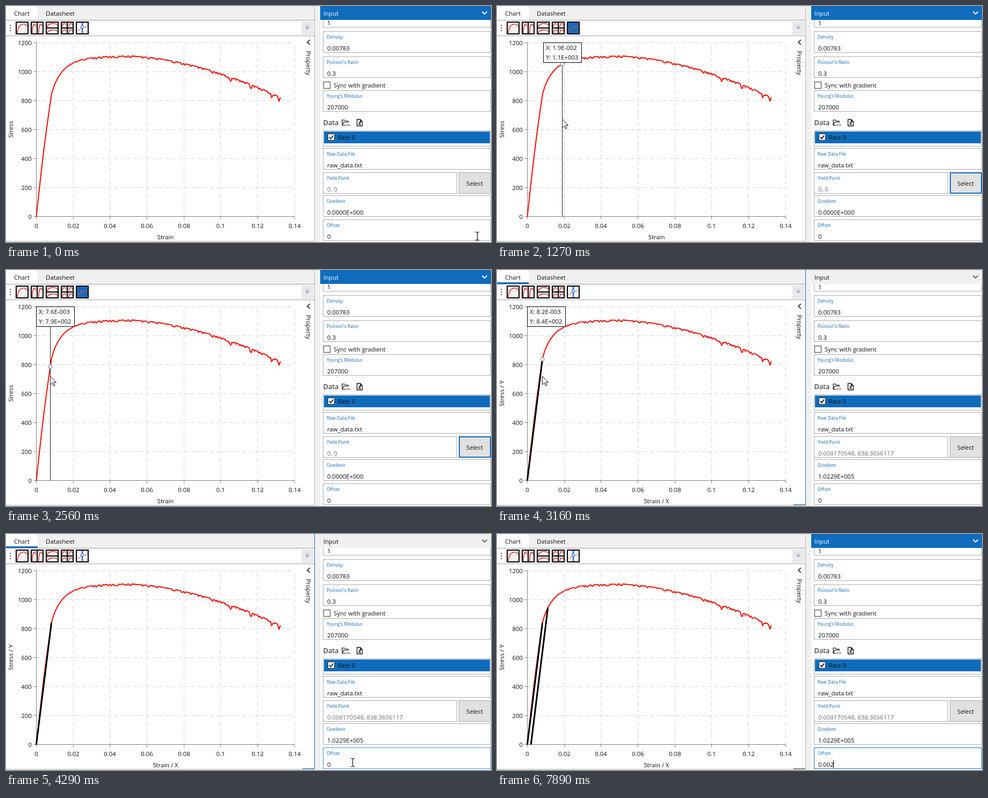
These frames come from a looping animation (903x440 px, 8.37 s). An HTML page with a canvas:

```html
<!DOCTYPE html>
<html lang="en">
<head>
<meta charset="utf-8">
<title>Yield point selection</title>
<style>
html, body { margin: 0; width: 100%; height: 100%; overflow: hidden; background: #fff; }
canvas { display: block; }
</style>
</head>
<body>
<canvas id="stage" width="903" height="440"></canvas>
<script>
const ctx = document.getElementById('stage').getContext('2d');
const LOOP = 8370;
const BLUE = '#0f6cbd', GREY = '#ababab', PANEL = '#f0f0f0', RED = '#f80c08', INK = '#111';
const FONT = '"Open Sans", "Noto Sans", sans-serif';

// Moments of the story, in ms
const ARMED = 790, PICKED = 3160, LEAVE = 3490, EDIT = 4480, MOUSE_HIDDEN = 5120, APPLIED = 6200;
const KEYS = [5210, 5410, 5540, 5740];
const BLINK = 1075;

// Plot geometry
const X0 = 56.5, Y0 = 392.5, TOP = 68.5, RIGHT = 537;
const perStrain = (RIGHT - X0) / 0.14, perStress = (Y0 - TOP) / 1200;
const yieldPoint = { x: X0 + 0.008170548 * perStrain, y: Y0 - 838.3656 * perStress };
const peak = { x: 222, y: 93 };

// Mouse strokes in small jumps, each ending at x, y
const mouseStart = { x: 877, y: 429 };
const strokes = [
  { from: 70, to: 590, steps: 9, x: 868, y: 330 },
  { from: 790, to: 1270, steps: 8, x: 121, y: 211 },
  { from: 1340, to: 1610, steps: 5, x: 84, y: 199 },
  { from: 1690, to: 1890, steps: 4, x: 80, y: 199 },
  { from: 2090, to: 2420, steps: 5, x: 79, y: 198 },
  { from: 2560, to: 2630, steps: 2, x: 84, y: 198 },
  { from: LEAVE, to: 4290, steps: 13, x: 645, y: 426 },
  { from: 7490, to: 7690, steps: 4, x: 790, y: 455 }
];

const fields = [
  { y: 0, label: '', value: () => '1' },
  { y: 47, label: 'Density', value: () => '0.00783' },
  { y: 94, label: "Poisson's Ratio", value: () => '0.3' },
  { y: 157, label: "Young's Modulus", value: () => '207000' },
  { y: 265, label: 'Raw Data File', value: () => 'raw_data.txt' },
  { y: 310, label: 'Yield Point', value: t => t < PICKED ? '0, 0' : '0.008170548, 838.3656117', w: 250, ink: '#707070' },
  { y: 353, label: 'Gradient', value: t => t < PICKED ? '0.0000E+000' : '1.0229E+005' },
  { y: 398, label: 'Offset', value: typedOffset, editable: true }
];

function typedOffset(t) {
  return '0.002'.slice(0, 1 + KEYS.filter(at => at <= t).length);
}

function caretOn(t) {
  const lastInput = Math.max(EDIT, ...KEYS.filter(at => at <= t));
  return (t - lastInput) % BLINK < BLINK / 2;
}

const ease = u => u * u * (3 - 2 * u);

function mouseAt(t) {
  if (t >= MOUSE_HIDDEN && t < strokes[strokes.length - 1].from) return null;
  let { x, y } = mouseStart;
  for (const s of strokes.filter(s => s.from <= t)) {
    const jump = Math.floor((t - s.from) / (s.to - s.from) * (s.steps - 1) + 1.1);
    const e = ease(Math.min(1, jump / s.steps));
    x += (s.x - x) * e;
    y += (s.y - y) * e;
  }
  return { x: Math.round(x), y: Math.round(y) };
}

function inside(m, x, y, w, h) {
  return m && m.x >= x && m.x < x + w && m.y >= y && m.y < y + h;
}

// Slightly bowed elastic line, saturating rise to the peak, then a power-law fall
function curveY(x) {
  if (x < yieldPoint.x) {
    const u = (x - X0) / (yieldPoint.x - X0);
    return Y0 + (yieldPoint.y - Y0) * (u + 0.05 * Math.sin(Math.PI * u));
  }
  if (x < peak.x) {
    return peak.y + (yieldPoint.y - peak.y) * Math.exp(-(((x - yieldPoint.x) / 22) ** 0.9));
  }
  return peak.y + 33 * ((x - peak.x) / 178) ** 1.75;
}

function noise(i) {
  const v = Math.sin(i * 91.7 + 3.1) * 43758.5453;
  return v - Math.floor(v);
}

function makeTrace() {
  const drops = [[168, 4], [384, 5], [418, 10], [456, 6], [495, 7], [508, 7]];
  const points = [];
  for (let x = X0; x <= 511; x += 2) {
    const r = noise(x), ripple = Math.min(1, Math.max(0, (x - 90) / 80));
    const drop = drops.reduce((sum, [at, depth]) => sum + depth * Math.max(0, 1 - Math.abs(x - at) / 3), 0);
    points.push([x, curveY(x) + drop + ripple * (r < 0.26 ? 2.6 : r - 0.5)]);
  }
  return points;
}
const trace = makeTrace();

// Drawing helpers
function fill(x, y, w, h, color) {
  ctx.fillStyle = color;
  ctx.fillRect(x, y, w, h);
}

function frame(x, y, w, h, color, width = 1) {
  ctx.strokeStyle = color;
  ctx.lineWidth = width;
  ctx.strokeRect(x + width / 2, y + width / 2, w - width, h - width);
}

function line(points, color, width = 1) {
  ctx.strokeStyle = color;
  ctx.lineWidth = width;
  ctx.beginPath();
  points.forEach(p => ctx.lineTo(p[0], p[1]));
  ctx.stroke();
}

function text(s, x, y, { size = 11.3, color = INK, align = 'left' } = {}) {
  ctx.font = `${size}px ${FONT}`;
  ctx.fillStyle = color;
  ctx.textAlign = align;
  ctx.fillText(s, x, y);
}

function turnedText(s, x, y, angle, align) {
  ctx.save();
  ctx.translate(x, y);
  ctx.rotate(angle);
  text(s, 0, 0, { align });
  ctx.restore();
}

function shape(d, x, y, { stroke, width = 1, inner }) {
  ctx.save();
  ctx.translate(x, y);
  const p = new Path2D(d);
  if (inner) { ctx.fillStyle = inner; ctx.fill(p); }
  if (stroke) { ctx.strokeStyle = stroke; ctx.lineWidth = width; ctx.stroke(p); }
  ctx.restore();
}

function circle(x, y, r, stroke, inner) {
  ctx.beginPath();
  ctx.arc(x, y, r, 0, Math.PI * 2);
  ctx.fillStyle = inner;
  ctx.fill();
  ctx.strokeStyle = stroke;
  ctx.lineWidth = 1;
  ctx.stroke();
}

function drawTabs(t) {
  const active = t >= PICKED && t < EDIT;
  fill(0, 0, 585, 440, PANEL);
  fill(0, 0, 59, 27, '#fff');
  fill(0, 27, 574, 411, '#fff');
  text('Chart', 15, 18);
  text('Datasheet', 74, 18);
  fill(0, 26, 574, 1, '#a0a0a0');
  fill(0, 55, 574, 1, '#a0a0a0');
  fill(574, 0, 1, 439, active ? BLUE : '#b4b4b4');
  fill(0, 438, 575, 1, '#b4b4b4');
  if (active) fill(0, 23, 59, 3, BLUE);
  if (t >= PICKED) fill(552, 437, 22, 1, active ? BLUE : '#505050');
}

function drawLayoutIcon(x, y, cols, rows) {
  const w = 24 / cols, h = 24 / rows;
  fill(x, y, 24, 24, '#f6f3f3');
  for (let c = 0; c < cols; c++) {
    for (let r = 0; r < rows; r++) {
      const left = x + c * w + 2.5, right = x + (c + 1) * w - 2.5;
      const top = y + r * h + 3, bottom = y + (r + 1) * h - 2;
      ctx.beginPath();
      ctx.moveTo(left, bottom);
      ctx.bezierCurveTo(left + w * 0.1, top - h * 0.05, right - w * 0.15, top - h * 0.05, right, top + h * 0.25);
      ctx.strokeStyle = '#d81c1c';
      ctx.lineWidth = 1.4;
      ctx.stroke();
    }
  }
  if (cols > 1) fill(x + 11, y, 2, 24, '#000');
  if (rows > 1) fill(x, y + 11, 24, 2, '#000');
  frame(x, y, 24, 24, '#000', 2);
}

function drawToolbar(t) {
  for (let y = 35; y < 50; y += 5) fill(7, y, 2, 2, '#555');
  for (let i = 0; i < 4; i++) drawLayoutIcon(18 + i * 28, 29, 1 + i % 2, 1 + (i >> 1));

  const armed = t >= ARMED && t < PICKED;
  fill(130, 29, 24, 24, armed ? BLUE : '#f4f4f4');
  frame(130, 29, 24, 24, '#000', 2);
  shape('M3 17C8 17 8 12 12 11S17 14 21 7', 130, 29, { stroke: armed ? '#e84545' : '#e89070', width: 1.5 });
  if (!armed) {
    fill(141, 31, 2, 20, '#1460c8');
    circle(142, 39, 2.7, '#1460c8', '#dce8f8');
  }
  fill(550, 28, 23, 26, '#e9eaed');
  fill(557, 36, 8, 1, '#a3a9c4');
  shape('M0 0H8L4 5Z', 557, 39, { inner: '#a3a9c4' });
}

function drawAxes(t) {
  const suffixed = t >= PICKED;
  const ticks = n => Array.from({ length: n }, (_, i) => i);
  const strainX = i => Math.round(X0 + i * 0.02 * perStrain - 0.5) + 0.5;
  const stressY = i => Y0 - i * 200 * perStress;

  ctx.setLineDash([7, 5]);
  ticks(8).slice(1).forEach(i => line([[strainX(i), Y0], [strainX(i), TOP]], '#dedede', 1.4));
  ticks(7).slice(1).forEach(i => line([[X0, stressY(i)], [RIGHT, stressY(i)]], '#dedede', 1.4));
  ctx.setLineDash([]);

  line([[X0, TOP], [X0, Y0], [RIGHT, Y0]], '#808080');
  ticks(8).forEach(i => {
    line([[strainX(i), Y0], [strainX(i), Y0 + 5]], '#808080');
    text(String(+(i * 0.02).toFixed(2)), strainX(i), 413.5, { align: 'center' });
  });
  ticks(7).forEach(i => {
    line([[X0 - 5, stressY(i)], [X0, stressY(i)]], '#808080');
    text(String(i * 200), 48, stressY(i) + 4, { align: 'right' });
  });
  text(suffixed ? 'Strain / X' : 'Strain', 297, 435, { align: 'center' });
  turnedText(suffixed ? 'Stress / Y' : 'Stress', 13, 230, -Math.PI / 2, 'center');
  line([[566, 63], [561, 67.5], [566, 72]], INK, 1.6);
  turnedText('Property', 558.5, 83.5, Math.PI / 2, 'left');
}

function drawCurves(t) {
  const offset = 0.002 * perStrain;
  ctx.lineJoin = ctx.lineCap = 'round';
  line(trace, RED, 2);
  if (t >= PICKED) line([[X0, Y0 - 1], [yieldPoint.x, yieldPoint.y]], '#000', 3);
  if (t >= APPLIED) line([[X0 + offset, Y0 - 1], [94.5, 139]], '#000', 3);
  ctx.lineJoin = 'miter';
  ctx.lineCap = 'butt';
}

function exponent(v) {
  const [mantissa, e] = v.toExponential(1).split('e');
  return `${mantissa}E${e[0]}${e.slice(1).padStart(3, '0')}`;
}

function drawTracker(t, m) {
  if (t < ARMED || t >= LEAVE || !inside(m, 56, 68, 482, 325)) return;
  const x = m.x + 0.5, y = curveY(x);
  if (t < PICKED) line([[x, TOP], [x, Y0]], '#222');
  circle(x, y, 3.5, '#777', '#fff');
  const left = Math.min(465, Math.max(56, Math.round(x - 36)));
  fill(left, 68, 72, 38, '#fff');
  frame(left, 68, 72, 38, '#000');
  text('X: ' + exponent((x - X0) / perStrain), left + 5, 82);
  text('Y: ' + exponent((Y0 - y) / perStress), left + 5, 100);
}

function drawField({ y, label, value, w = 313, ink = INK, editable }, t, m) {
  const focused = editable && t >= EDIT;
  const hover = t >= strokes[0].from && inside(m, 590, y, w, 40);
  fill(590, y, w, 40, '#fff');
  frame(590, y, w, 40, focused ? BLUE : hover ? '#3a93dc' : GREY);
  text(label, 597, y + 14.3, { size: 8.5, color: BLUE });
  const shown = value(t);
  text(shown, 598, y + 35.5, { color: ink });
  if (focused && caretOn(t)) {
    fill(Math.round(597.6 + ctx.measureText(shown).width), y + 23, 1, 16, '#000');
  }
}

function drawCheckbox(x, y, checked) {
  fill(x, y, 13, 13, '#fff');
  frame(x, y, 13, 13, '#333');
  if (checked) line([[x + 3, y + 6.5], [x + 5.5, y + 9.5], [x + 10, y + 3.5]], INK, 1.8);
}

function drawInputPanel(t, m) {
  fill(585, 0, 318, 440, '#fff');
  fields.forEach(f => drawField(f, t, m));

  const active = t < PICKED || t >= EDIT;
  fill(585, 0, 318, 26, active ? BLUE : PANEL);
  text('Input', 591, 18, { color: active ? '#fff' : INK });
  line([[886.5, 10.5], [891, 15], [895.5, 10.5]], active ? '#fff' : '#666', 1.8);

  drawCheckbox(591, 141, false);
  text('Sync with gradient', 610, 152);

  text('Data', 590.5, 222, { size: 13.1 });
  shape('M7 11H1V1H5L6.5 3H12V5M1 11L4 5H13', 625, 211.5, { stroke: INK, width: 1.2 });
  for (let x = 633; x < 640; x += 3) fill(x, 221, 1.6, 1.6, INK);
  shape('M1 1H7L11 5V13H1ZM7 1V5H11M4 6L8 11M8 6L4 11', 652.5, 210.5, { stroke: INK, width: 1.3 });

  frame(590, 232, 313, 30, GREY);
  fill(592, 234, 309, 22, BLUE);
  drawCheckbox(599, 238, true);
  text('Rate 0', 617, 249);

  const armed = t >= ARMED && t < PICKED;
  fill(843, 310, 60, 40, '#e1e1e1');
  frame(843, 310, 60, 40, armed ? BLUE : GREY, armed ? 2 : 1);
  text('Select', 872.5, 335, { align: 'center' });
}

function drawMouse(m) {
  if (!m) return;
  if (fields.some(f => inside(m, 590, f.y, f.w || 313, 40))) {
    shape('M-3 -7.5H-1L0.5 -6.5L2 -7.5H4M0.5 -6.5V6.5M-3 7.5H-1L0.5 6.5L2 7.5H4', m.x, m.y, { stroke: '#000', width: 1.1 });
  } else {
    shape('M0.5 0.5V16.5L4 13L6.5 18.5L9 17.5L6.5 12H11.5Z', m.x, m.y - 0.5, { stroke: INK, inner: '#fff' });
  }
}

function draw(now) {
  const t = now % LOOP;
  const m = mouseAt(t);
  drawTabs(t);
  drawToolbar(t);
  drawAxes(t);
  drawCurves(t);
  drawTracker(t, m);
  drawInputPanel(t, m);
  drawMouse(m);
}

function tick() {
  draw(performance.now());
  requestAnimationFrame(tick);
}
tick();
</script>
</body>
</html>
```
